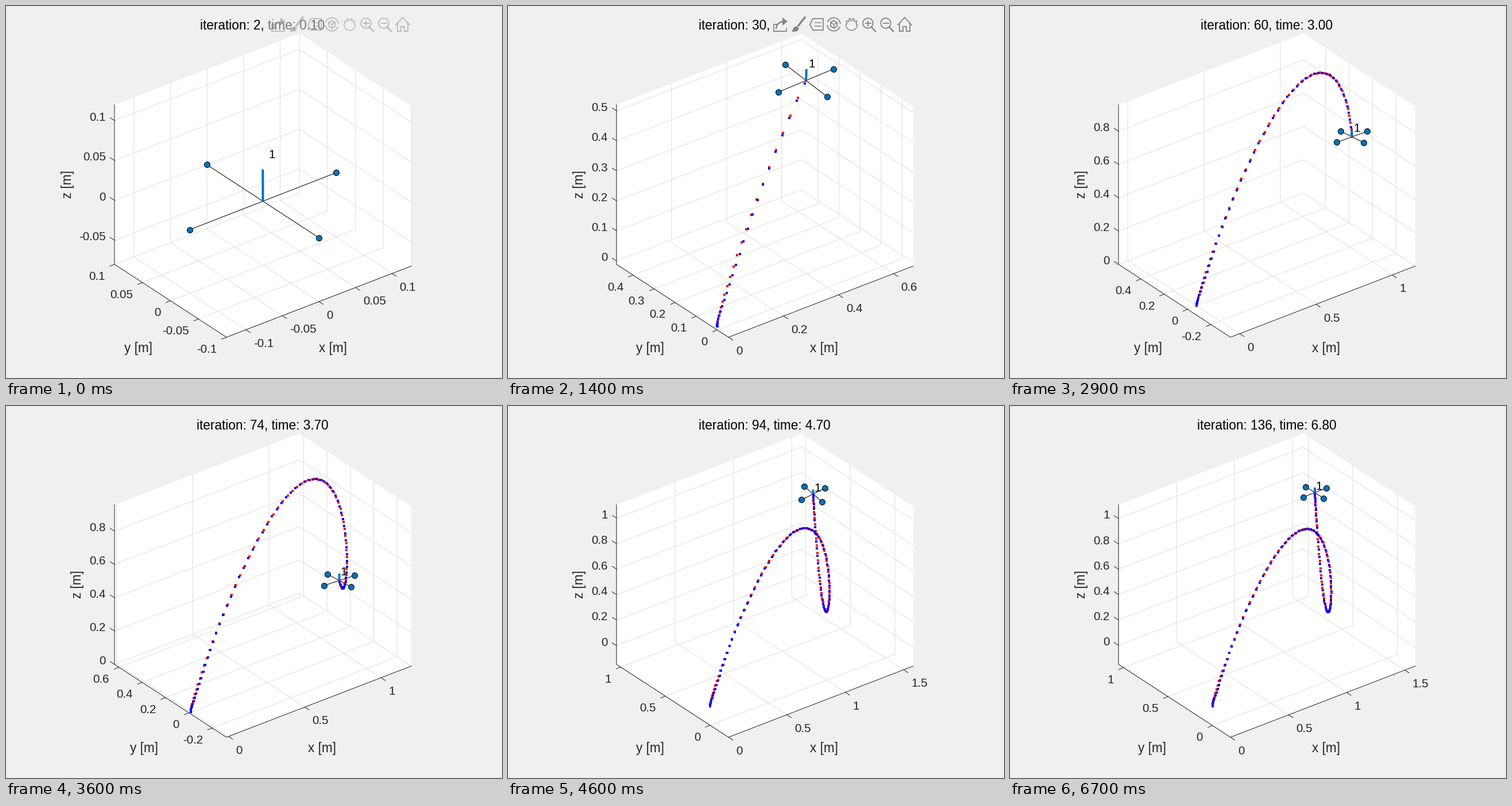
A matplotlib script for the animation above (6.8 s loop, 864 by 648 pixels).

```python
import numpy as np
import matplotlib.pyplot as plt
from matplotlib.animation import FuncAnimation
from matplotlib.patches import Circle, Polygon, Rectangle, Arc

W, H, FRAMES, DT = 864, 648, 68, 0.05
BLUE, INK, GRID, BG, ICON = "#0072bd", "#262626", "#dedede", "#f0f0f0", "#858585"
TICK, LABEL = 20.6, 22.6

# projected box: front corner and its three edges, in pixels
CORNER = np.array([384.0, 577.0])
EDGES = np.array([[322.0, -124.0], [-195.0, -127.0], [0.0, -278.0]])
RATIO = np.array([1.264, 1.0, 1.0])
MAX_STEPS = (6, 6, 7)

# waypoints passed at equal intervals, from rest at the origin to a hover
FLIGHT = 4.9
WAY = np.array([(0.052, 0.043, 0.045), (0.493, 0.297, 0.393),
                (0.926, 0.302, 0.887), (1.000, 0.012, 0.825),
                (1.028, 0.040, 0.362), (1.316, 0.527, 0.557),
                (1.491, 0.797, 0.797)])
N = len(WAY)
SHIFT = np.r_[0, 0, np.arange(N) / N]
POWER = np.r_[3, 4, np.full(N, 5)]


def basis(s, d=0):
    """d-th derivative of the minimum-jerk spline basis, s in 0..1."""
    x = np.maximum(np.asarray(s, float)[..., None] - SHIFT, 0)
    factor = np.prod([POWER - j for j in range(d)], axis=0)
    return factor * x ** (POWER - d)


COEF = np.linalg.solve(
    np.vstack([basis(np.arange(1, N + 1) / N), basis(1, 1), basis(1, 2)]),
    np.vstack([WAY, np.zeros((2, 3))]))


def flown(t, d=0):
    return basis(np.clip(t / FLIGHT, 0, 1), d) @ COEF / FLIGHT**d


def planned(t):
    p = flown(t - 0.02 * np.tanh(t - 1.05))
    p[:, 0] += 0.009 * np.exp(-((t - 0.9) / 0.25) ** 2)
    return p


def drone(t):
    """Centre, four rotor positions and the tip of the mast."""
    c = flown(t)
    up = flown(t, 2) + [0, 0, 9.81]
    up /= np.linalg.norm(up)
    arms = np.array([(1, 0, -up[0] / up[2]), (0, 1, -up[1] / up[2])])
    arms *= 0.1 / np.linalg.norm(arms, axis=1, keepdims=True)
    return c, c + np.vstack([arms, -arms]), c + 0.04 * up


def ticks(lo, hi, most):
    step = next(m * 10.0**e for e in range(-3, 2) for m in (1, 2, 5)
                if (hi - lo) / (m * 10.0**e) <= most)
    n = np.arange(np.ceil(lo / step - 1e-2), np.floor(hi / step + 1e-2) + 1)
    return np.round(n * step, 6) + 0.0


def text_width(s):
    return TICK * sum({".": 0.278, "-": 0.333}.get(ch, 0.556) for ch in s)


plt.rcParams["font.family"] = "Liberation Sans"
fig = plt.figure(figsize=(W / 72, H / 72), dpi=72, facecolor=BG)
ax = fig.add_axes([0, 0, 1, 1])


def line(pts, color=INK, lw=1.0, **kw):
    pts = np.asarray(pts)
    ax.plot(pts[:, 0], pts[:, 1], color=color, lw=lw, **kw)


def write(x, y, s, size=TICK, color=INK, ha="center", **kw):
    ax.text(x, y, s, size=size, color=color, ha=ha, va="baseline", **kw)


def dots(pts, color):
    ax.plot(pts[:, 0], pts[:, 1], "s", color=color, ms=4, mew=0)


def toolbar(alpha):
    z = dict(alpha=alpha, zorder=10)

    def stroke(*pts, lw=1.8):
        line(pts, ICON, lw, solid_joinstyle="miter", **z)

    def fill(*pts):
        ax.add_patch(Polygon(pts, fc=ICON, lw=0, **z))

    def polar(x, y, r, a):
        return np.column_stack([x + r * np.cos(a), y - r * np.sin(a)])

    ax.add_patch(Rectangle((456, 17), 252, 29, fc=BG, lw=0, **z))
    # export
    stroke((468, 32), (463, 32), (463, 44), (485, 44), (485, 39))
    ax.add_patch(Arc((480, 40), 26, 26, theta1=180, theta2=270,
                     ec=ICON, lw=2.4, **z))
    fill((478, 20), (487, 27), (478, 34))
    # brush
    stroke((517, 20), (506, 34), lw=3.4)
    fill((494, 45), (498, 37), (503, 35), (507, 39), (504, 44))
    # data tip
    stroke((526, 32), (531, 22), (549, 22), (549, 42), (531, 42), (526, 32))
    for y in (29, 35):
        stroke((535, y), (545, y), lw=1.5)
    # rotate
    for start in (20, 200):
        ax.add_patch(Arc((567.5, 32), 23, 23, theta1=start, theta2=start + 155,
                         ec=ICON, lw=1.8, **z))
    cube = polar(567.5, 32, 6.5, np.pi / 2 + np.arange(7) * np.pi / 3)
    stroke(*cube)
    for corner in cube[1:6:2]:
        stroke((567.5, 32), corner, lw=1.5)
    # hand: a circle whose upper half ripples into four fingers
    a = np.linspace(0, 2 * np.pi, 90)
    fingers = np.sqrt(np.clip(np.sin(a), 0, 1)) * np.cos(10 * a)
    stroke(*polar(598.5, 33, 9.5 + 2.5 * fingers, a), lw=1.5)
    # zoom in, zoom out
    for x in (627, 658):
        ax.add_patch(Circle((x, 30), 8.8, fc="none", ec=ICON, lw=1.8, **z))
        stroke((x + 6, 36.5), (x + 13, 44), lw=2.4)
        stroke((x - 4.5, 30), (x + 4.5, 30))
    stroke((627, 25.5), (627, 34.5))
    # home
    stroke((679, 33), (691, 20), (703, 33))
    for side in (-1, 1):
        stroke(*[(691 + side * dx, y)
                 for dx, y in ((9, 30), (9, 44), (3, 44), (3, 36), (0, 36))])


def draw_axes(lo, hi, to_px):
    (x0, y0, z0), (x1, y1, z1) = lo, hi
    front, left, right = CORNER, CORNER + EDGES[1], CORNER + EDGES[0]
    back, rise = left + EDGES[0], EDGES[2]
    ax.add_patch(Polygon([front, right, right + rise, back + rise, left + rise, left],
                         fc="white", lw=0))
    marks = [ticks(a, b, m) for a, b, m in zip(lo, hi, MAX_STEPS)]
    for v in marks[0]:
        line(to_px([(v, y0, z0), (v, y1, z0), (v, y1, z1)]), GRID)
    for v in marks[1]:
        line(to_px([(x0, v, z0), (x1, v, z0), (x1, v, z1)]), GRID)
    for v in marks[2]:
        line(to_px([(x0, y1, v), (x1, y1, v), (x1, y0, v)]), GRID)
    line([left + rise, left, front, right])

    # per axis: tick base, tick vector, label offset, alignment
    style = [(lambda v: (v, y0, z0), (7.5, 4.9), (13, 22.5), "left"),
             (lambda v: (x0, v, z0), (-8, 3.2), (-16.5, 19.5), "right"),
             (lambda v: (x0, y1, v), (-7.5, -4.9), (-15, -7), "right")]
    extra = []
    for vals, (base, vec, off, ha) in zip(marks, style):
        names = [f"{v:g}" for v in vals]
        for v, s in zip(vals, names):
            p = to_px(base(v))
            line([p, p + vec])
            write(p[0] + off[0], p[1] + off[1] + 7.4, s, ha=ha)
        extra.append(max(map(text_width, names)) - text_width("0.5"))
    write(551 + extra[0], 603, "x [m]", LABEL)
    write(247.5 - 0.95 * extra[1], 603, "y [m]", LABEL)
    write(131 - 0.92 * extra[2], 311, "z [m]", LABEL, rotation=90,
          rotation_mode="anchor")


def draw(k):
    ax.clear()
    ax.set(xlim=(0, W), ylim=(H, 0))
    ax.axis("off")

    n = 2 * k + 2
    now = n * DT
    times = np.arange(n + 1) * DT
    real, plan = flown(times), planned(times)
    c, rotors, tip = drone(now)

    # tight limits, widened to keep equal scale on all axes
    pts = np.vstack([real, plan, rotors, tip])
    low, high = pts.min(0), pts.max(0)
    size = ((high - low) / RATIO).max()
    span = size * RATIO
    lo = (low + high - span) / 2

    def to_px(p):
        return CORNER + ((np.asarray(p) - lo) / span) @ EDGES

    draw_axes(lo, lo + span, to_px)

    ends = to_px(rotors)
    line(ends[::2], "black")
    line(ends[1::2], "black")
    if k:
        dots(to_px(real), "red")
        dots(to_px(plan), "blue")
    line(to_px([c, tip]), BLUE, 4, solid_capstyle="butt")
    ax.plot(ends[:, 0], ends[:, 1], "o", ms=10, mfc=BLUE, mec="black", mew=1)
    tag = to_px(c + [0, 0, 0.06])
    write(tag[0] + 6 + 1.9 / size, tag[1] + 8.6, "1", color="black")

    write(447, 41.5, f"iteration: {n}, time: {now:.2f}", LABEL, "black")
    fade = np.clip(min(0.5 + 0.5 * k, 9.45 - 0.4 * k), 0, 1)
    if fade > 0:
        toolbar(fade)
    return []


anim = FuncAnimation(fig, draw, frames=FRAMES, interval=100, repeat=True)
plt.show()
```
